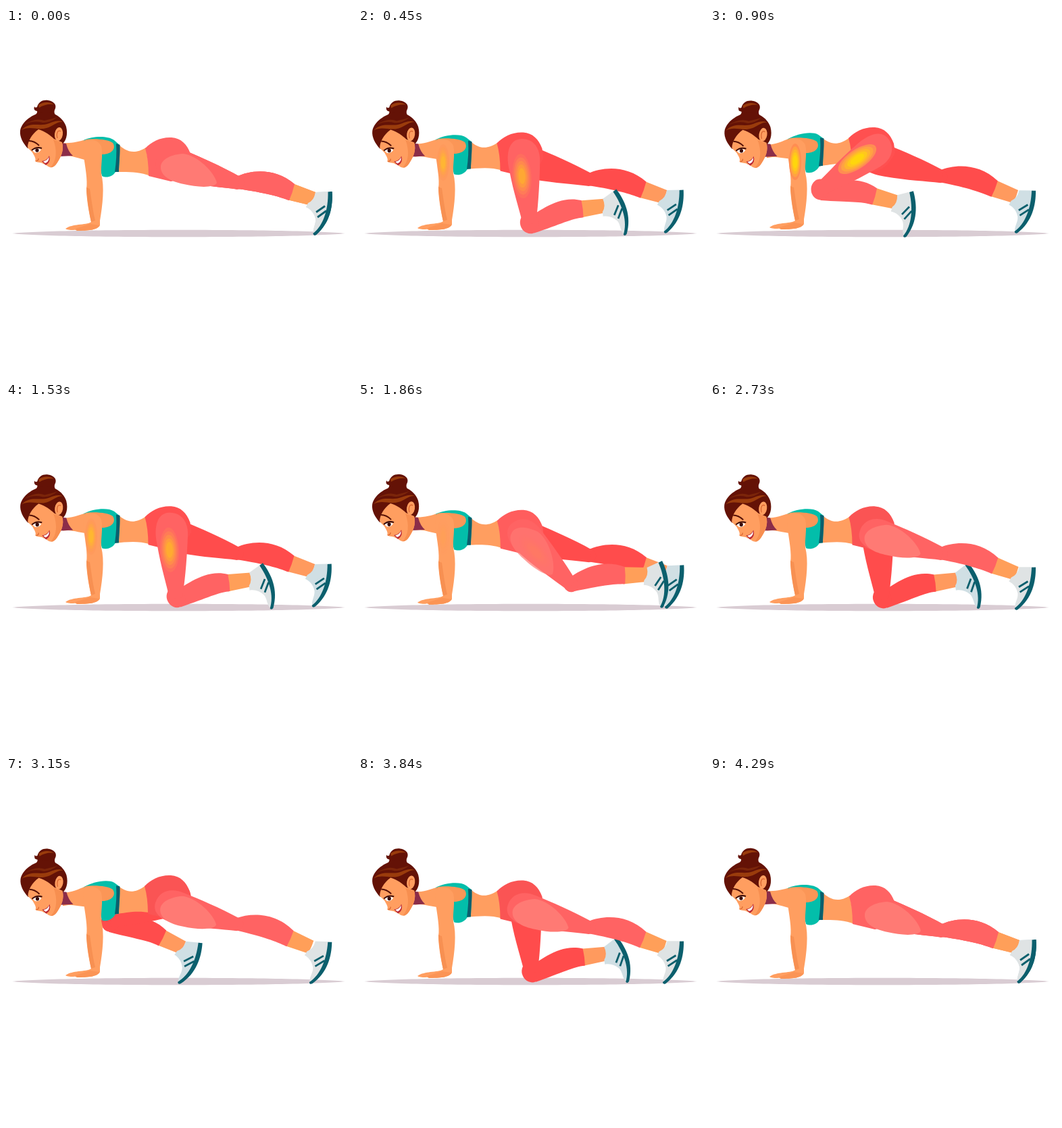
Animation of 512x512 px, one loop 4500 ms. Source, as an HTML page with a canvas:

```html
<!DOCTYPE html>
<html lang="en">
<head>
<meta charset="utf-8">
<title>Mountain climber</title>
<style>
html, body { margin: 0; width: 100%; height: 100%; overflow: hidden; background: #fff; }
canvas { display: block; width: 100vw; height: 100vh; object-fit: contain; }
</style>
</head>
<body>
<canvas id="stage" width="512" height="512"></canvas>
<script>
const ctx = document.getElementById('stage').getContext('2d');
const LOOP = 4500, CYCLE = 2250, STEP = 30;
const THIGH = 100.6, SHIN = 112.4;
const SKIN = '#ff9e60', SKIN_DARK = '#f79052', TEAL = '#03beaa', DEEP = '#0b5f6d';

const REST = { hip: [247, 199], knee: [343, 229], ankle: [453, 252] };
const angle = (a, b) => Math.atan2(b[1] - a[1], b[0] - a[0]);
const REST_THIGH = angle(REST.hip, REST.knee);
const REST_SHIN = angle(REST.knee, REST.ankle);

const NEAR = { leg: '#ff6363', skin: '#ff9f59', shoe: '#dfe3e4', hip: [246, 182],
  mid: [363, 263], front: [274, 257], tilt: [0, -8, -9], planted: [452, 253] };
const FAR = { leg: '#ff4c4c', skin: '#ff9a5e', shoe: '#d0dfe4', hip: [250, 184],
  mid: [365, 263], front: [260, 253], tilt: [0, -9, 0], planted: [452, 249] };

const lerp = (a, b, p) => a + (b - a) * p;
const lerpPt = (a, b, p) => [lerp(a[0], b[0], p), lerp(a[1], b[1], p)];
const mix = (a, b, p) => `rgb(${a.map((v, i) => Math.round(lerp(v, b[i], p)))})`;
const ease = x => (1 - Math.cos(Math.PI * x)) / 2;

// Every swing pauses softly at the half-way pose.
const swingEase = x => x < 0.5 ? ease(2 * x) / 2 : 0.5 + ease(2 * x - 1) / 2;

function swingAt(c) {
  if (c < 900) return swingEase(c / 900);
  if (c < 1125) return 1;
  if (c < 2025) return swingEase(1 - (c - 1125) / 900);
  return 0;
}

function fill(d, color) {
  ctx.fillStyle = color;
  ctx.fill(new Path2D(d));
}

function line(d, color, width) {
  ctx.strokeStyle = color;
  ctx.lineWidth = width;
  ctx.stroke(new Path2D(d));
}

function oval(x, y, rx, ry, color, rot = 0) {
  ctx.fillStyle = color;
  ctx.beginPath();
  ctx.ellipse(x, y, rx, ry, rot, 0, 7);
  ctx.fill();
}

function group(draw) {
  ctx.save();
  draw();
  ctx.restore();
}

function glow(x, y, rx, ry, heat) {
  group(() => {
    ctx.globalAlpha = heat ** 2;
    ['#ff8d52', '#ffa243', '#ffb52e', '#ffc81c', '#ffd60c'].forEach((c, i) => {
      const s = 1 - i * 0.16;
      oval(x, y, rx * s, ry * s, c);
    });
  });
}

// Places artwork drawn in the resting pose onto a moved, turned joint.
function pin(from, to, turn) {
  ctx.translate(to[0], to[1]);
  ctx.rotate(turn);
  ctx.translate(-from[0], -from[1]);
}

function bendKnee(hip, ankle) {
  const dist = Math.min(Math.hypot(ankle[0] - hip[0], ankle[1] - hip[1]), THIGH + SHIN);
  const cos = (THIGH ** 2 + dist ** 2 - SHIN ** 2) / (2 * THIGH * dist);
  const a = angle(hip, ankle) + Math.acos(Math.min(1, cos));
  return [hip[0] + THIGH * Math.cos(a), hip[1] + THIGH * Math.sin(a)];
}

function pose(side, swing, lift) {
  if (!swing) {
    return { hip: lerpPt(REST.hip, [246, 191], lift), knee: lerpPt(REST.knee, [342, 219.5], lift),
      ankle: lerpPt(REST.ankle, side.planted, Math.min(1, lift * 2)), tilt: 0, bend: 0 };
  }
  const hip = lerpPt(REST.hip, side.hip, Math.min(1, lift * 1.2));
  const late = swing > 0.5, q = late ? 2 * swing - 1 : 2 * swing;
  const ankle = late ? lerpPt(side.mid, side.front, q) : lerpPt(REST.ankle, side.mid, q);
  const tilt = lerp(side.tilt[late ? 1 : 0], side.tilt[late ? 2 : 1], q) * Math.PI / 180;
  return { hip, knee: bendKnee(hip, ankle), ankle, tilt, bend: late ? 1 : q };
}

function shoe(color) {
  fill('M458 243L479 242C481 262 475 287 460 304L455 303C454 296 459 290 458 282C456 274 451 268 444 265L447 259Q456 255 458 243Z', color);
  fill('M476.5 242.5L482.5 242C484 263 480 288 459 306Q455 308 454.5 304C470 292 477 268 476.5 242.5Z', DEEP);
  line('M459 272.5L472 263.5M461 280L474 270.5', DEEP, 2.8);
}

function leg(side, swing, lift) {
  const { hip, knee, ankle, tilt, bend } = pose(side, swing, lift);
  const thighDir = angle(hip, knee), shinDir = angle(knee, ankle);

  group(() => {
    pin(REST.knee, knee, shinDir - REST_SHIN);
    fill('M424 230L458 243C456 250 455 258 449 262L416 254Z', side.skin);
    fill(`M341 220C362 ${210 + 11 * bend} 398 ${206 + 2 * bend} 427 231Q424 244 419 255C402 249 385 ${244 + 6 * bend} 343 ${238 + 7 * bend}Z`, side.leg);
    oval(343, 229, 9.5 + 4 * bend, 9.5 + 6 * bend, side.leg);
  });
  group(() => {
    pin(REST.ankle, ankle, shinDir - REST_SHIN + tilt);
    shoe(side.shoe);
  });
  group(() => {
    ctx.translate(hip[0], hip[1]);
    ctx.rotate(thighDir);
    ctx.scale(Math.hypot(knee[0] - hip[0], knee[1] - hip[1]) / THIGH, 1);
    fill('M-25 4C-25 -14 -10 -25 12 -22C35 -20 70 -16 101 -9.5L103 9.5C80 13 55 20 20 24C-8 28 -25 20 -25 4Z', side.leg);
    if (side === NEAR) {
      group(() => {
        ctx.globalAlpha = Math.max(0, 1 - 2 * swing);
        ctx.rotate(-REST_THIGH);
        ctx.translate(-REST.hip[0], -REST.hip[1]);
        fill('M229 206C229 194 245 187 262 186C283 188 309 214 312 229C309 237 283 236 263 231C243 227 229 219 229 206Z', '#ff7a74');
      });
      if (swing) glow(30, 6, 33, 14, swing);
    }
  });
}

function torso(lift) {
  group(() => {
    const k = 0.15 * lift;
    ctx.transform(1, -k, 0, 1, 0, 105 * k);
    fill('M84 170C97 171 108 168 118 165L166 172C176 181 188 189 207 177L214 219C195 212 180 213 160 213L125 197C112 194 100 190 92 189L84 189Z', SKIN);
    fill('M115 166C128 160 150 159 160 166L168 173C169 187 167 202 167 213L162 213C157 221 148 222 142 219L135 190Z', TEAL);
    fill('M163 171L168.5 173C169 187 167 202 167 213L161 213C163 199 164 185 163 171Z', DEEP);
  });
}

function pelvis(lift, color) {
  group(() => {
    ctx.translate(-lift, -15 * lift);
    fill('M206 178C215 168 230 161 245 162C259 163 268 172 273 186L275 200C265 219 254 226 244 227L211 219Q211 195 206 178Z', color);
  });
}

function arm(lift, heat) {
  group(() => {
    ctx.translate(0, -2 * lift);
    fill('M118 165C132 163 152 165 158 170C163 177 158 187 142 187Z', '#fb9657');
    fill('M116 166C126 163 137 166 141 175C144 186 140 205 141 216C146 235 143 262 139 285L139 292C136 299 120 300 105 300Q102 298 100 299Q91 299 88 297C93 293 101 292 107 291C115 290 122 290 126 287C122 270 119 250 119 238C121 225 117 205 115 190C114 180 114 172 116 166Z', SKIN);
    fill('M119 236C120 255 123 272 126 287L132 285C128 268 126 250 124 238Z', SKIN_DARK);
    fill('M103 297L124 290L138 292C136 299 120 300 105 300Z', '#fb9455');
    if (heat) glow(126, 200, 9, 27, heat);
  });
}

function head(lift) {
  const hair = '#641206', streak = '#9a3c0c';
  group(() => {
    ctx.translate(0.5 * lift, 0.8 * lift);
    // neck shadow
    fill('M80 170L89 171Q92 183 99 189L80 190Z', '#8b2d49');
    // bun
    fill('M46 117C48 109 55 106 62 107C70 108 75 113 73 119C71 123 70 127 77 133L41 134C43 128 47 126 46 123Q40 122 42 116Q43 119 46 117Z', hair);
    fill('M48 114C55 109 64 109 71 113C63 112 55 114 49 118Z', streak);
    // hair
    fill('M21 152C23 140 36 129 52 125C70 122 85 133 89 146C92 158 89 168 81 174L55 176L32 178C25 170 20 161 21 152Z', hair);
    fill('M23 151C36 137 50 147 64 141C72 138 77 136 84 139C75 138 70 145 60 148C46 152 36 144 23 151Z', streak);
    fill('M27 143Q43 132 57 137Q70 134 76 132Q64 141 54 140Q41 136 27 143Z', '#7b250a');
    // face
    fill('M32 177C32 168 38 157 48 150C58 153 66 159 71 164L83 169C86 180 82 190 76 199C73 204 69 207 65 206C61 205 60 202 55 201C52 198 47 200 43 197C45 193 41 188 39 184Z', SKIN);
    fill('M70 165L83 170C86 180 82 190 76 199C73 204 69 207 66 206C75 197 76 181 70 165Z', '#f78f50');
    // ear
    oval(78, 157, 6, 10, SKIN, 0.15);
    line('M76 163C74 155 77 150 81 153', '#d96731', 1.3);
    // brow, eye, nose and smile
    line('M34 167Q42 167 49 174', '#551006', 2);
    fill('M39 181Q46 176 52 180Q48 186 42 184Z', '#fff');
    oval(46, 181, 2.6, 2.8, '#3a0b08');
    line('M38 181Q45 175 53 178', '#3a0b08', 2);
    line('M44 197Q48 197 48 193', '#d96731', 1.2);
    fill('M53 197Q61 196 64 189Q67 198 59 203Z', '#b92834');
    fill('M55 197.5Q61 196 63.5 191Q64 198 58 200Z', '#fff');
  });
}

function draw(time) {
  const t = Math.floor((time % LOOP) / STEP) * STEP;
  const lift = swingAt(t % CYCLE);
  const near = t < CYCLE ? lift : 0, far = t < CYCLE ? 0 : lift;
  const hips = mix([255, 99, 99], near ? [255, 80, 80] : [250, 84, 84], Math.min(1, lift * 2));

  ctx.fillStyle = '#fff';
  ctx.fillRect(0, 0, 512, 512);
  fill('M9 304C70 297 440 297 502 304C440 311 70 311 9 304Z', '#d9ccd3');
  leg(FAR, far, lift);
  torso(lift);
  pelvis(lift, hips);
  leg(NEAR, near, lift);
  arm(lift, near);
  head(lift);
}

function tick() {
  draw(performance.now());
  requestAnimationFrame(tick);
}
tick();
</script>
</body>
</html>
```
